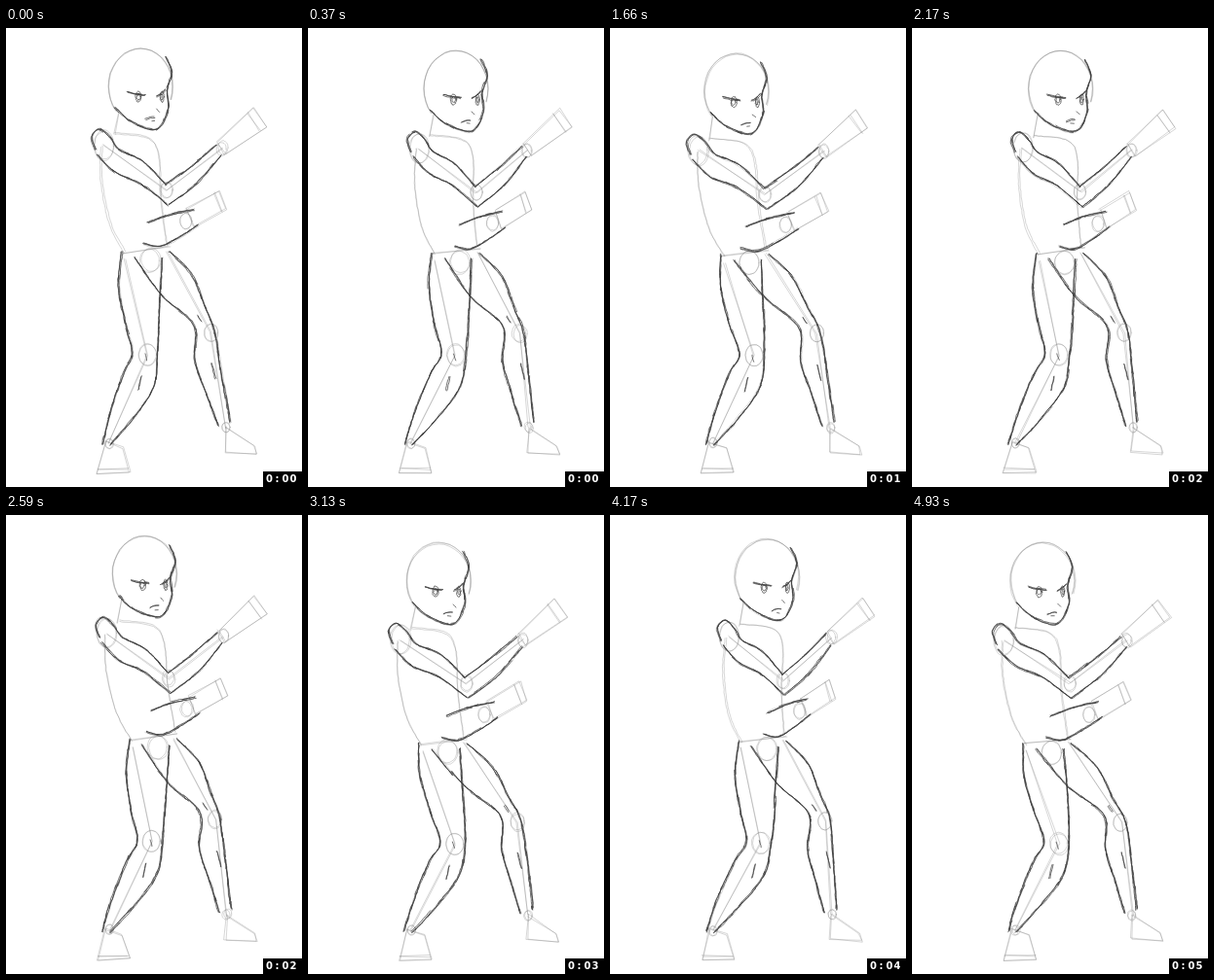
These frames come from a looping animation (304x472 px, 5.03 s). An HTML page:

```html
<!DOCTYPE html>
<html lang="en">
<head>
<meta charset="utf-8">
<title>Pencil figure</title>
<style>
  html, body { margin: 0; width: 100%; height: 100%; overflow: hidden; background: #fff; }
  svg { display: block; width: 100%; height: 100%; }
  path { fill: none; stroke-linecap: round; stroke-linejoin: round; }
  text { font: bold 10px "DejaVu Sans", sans-serif; fill: #fff; }
</style>
</head>
<body>
<svg viewBox="0 0 304 472">
  <path id="light" stroke="#888" stroke-width=".45" stroke-opacity=".75"/>
  <path id="dark" stroke="#3c3c3c" stroke-width=".9" stroke-opacity=".8"/>
  <rect x="264" y="456" width="40" height="16"/>
  <text id="clock" x="267 276.5 283.5 291.5" y="467">0:00</text>
</svg>
<script>
const LOOP = 5030, SWAY = 1790, SECOND = 960;
// Start of each drawing, in ms
const cuts = [0, 120, 250, 370, 510, 630, 750, 860, 980, 1120, 1240, 1400, 1540, 1660, 1780, 1910,
  2030, 2170, 2300, 2440, 2590, 2720, 2870, 3010, 3130, 3270, 3390, 3530, 3650, 3800, 3920,
  4170, 4290, 4450, 4590, 4700, 4820, 4930];

// The sway: pixels of offset at a few moments of its cycle
const keys = [0, 590, 800, 980, 1345, 1660, SWAY];
const channels = {
  lean: [0, 22, 4, 0, -5, -9, 0],
  dip: [0, 4, 1, -1, 8, 5, 0],
  hip: [0, 13, 8, -6, -5, -5, 0]
};

const el = id => document.getElementById(id);
const clamp = v => Math.min(1, Math.max(0, v));
const lastIndex = (list, t) => list.filter(v => v <= t).length - 1;
const pairs = row => row.flatMap((v, i) => i % 2 ? [] : [[v, row[i + 1]]]);
const between = (a, b, k) => [a[0] + (b[0] - a[0]) * k, a[1] + (b[1] - a[1]) * k];

let seed = 1;
const rand = () => (seed = seed * 16807 % 2147483647) / 2147483647;
const wobble = size => (rand() * 2 - 1) * size;

function channel(values, phase) {
  const i = lastIndex(keys, phase);
  return values[i] + (values[i + 1] - values[i]) * (phase - keys[i]) / (keys[i + 1] - keys[i]);
}

// How each region of the body follows the sway
const follow = {
  head: (x, y, { lean, dip }) => [x + lean, y + dip],
  arm(x, y, { lean, dip }) {
    const out = clamp((x - 100) / 120);
    return [x + lean * (1 - .75 * out), y + dip * (1 - .4 * out)];
  },
  torso(x, y, { lean, dip, hip }) {
    const down = clamp((y - 110) / 120);
    return [x + lean + (hip - lean) * down, y + dip * (1 - .4 * down)];
  },
  leg(x, y, { dip, hip }) {
    const up = clamp((430 - y) / 200), knee = clamp(1 - Math.abs(y - 325) / 95);
    return [x + hip * up + 1.1 * dip * knee, y + .6 * dip * up];
  }
};

function smooth(pts) {
  const out = [];
  for (let i = 0; i < pts.length - 1; i++) {
    const a = pts[i - 1] || pts[i], b = pts[i], c = pts[i + 1], d = pts[i + 2] || c;
    const steps = Math.ceil(Math.hypot(c[0] - b[0], c[1] - b[1]) / 3);
    for (let n = 0; n < steps; n++) {
      const s = n / steps;
      out.push([0, 1].map(k => b[k] + s * (c[k] - a[k]) / 2
        + s * s * (a[k] - 2.5 * b[k] + 2 * c[k] - d[k] / 2)
        + s * s * s * (1.5 * (b[k] - c[k]) + (d[k] - a[k]) / 2)));
    }
  }
  return [...out, pts[pts.length - 1]];
}

function arc([cx, cy], rx, ry, from = 0, to = 360) {
  return Array.from({ length: 25 }, (_, i) => {
    const a = (from + (to - from) * i / 24) * Math.PI / 180;
    return [cx + rx * Math.cos(a), cy + ry * Math.sin(a)];
  });
}

function trace(pts, spread, grain) {
  const dx = wobble(spread), dy = wobble(spread);
  return pts.map(([x, y], i) => (i ? 'L' : 'M') + (x + dx + wobble(grain)).toFixed(1)
    + ' ' + (y + dy + wobble(grain)).toFixed(1)).join('');
}

function draw(index) {
  const phase = cuts[index] % SWAY, pose = {};
  for (const name in channels) pose[name] = channel(channels[name], phase);
  seed = 977 + index * 7919;
  let dark = '', light = '';

  const place = (region, ...row) => pairs(row).map(([x, y]) => follow[region](x, y, pose));
  const thin = (pts, passes = 2) => {
    for (let n = 0; n < passes; n++) light += trace(pts, 1.1, .3);
  };
  const straight = pts => {
    for (let n = 0; n < 2; n++) light += trace(pts, .4, 1.1);
  };
  // Short overlapping strokes along a curve
  const ink = (pts, passes = 3) => {
    const line = smooth(pts);
    for (let n = 0; n < passes; n++) {
      for (let i = 0; i < line.length - 1;) {
        const end = i + 5 + Math.floor(rand() * 9);
        dark += trace(line.slice(Math.max(0, i - 1), end + 1), .85, .35);
        i = end;
      }
    }
  };
  const outline = (...spec) => {
    const pts = place(...spec);
    ink(pts);
    thin(smooth(pts), 1);
  };
  const box = (region, ...row) => {
    const pts = place(region, ...row), [a, b, c, d] = pts;
    straight([...pts, a]);
    straight([between(a, b, .85), between(d, c, .85)]);
  };
  const ball = (center, rx, ry) => thin(arc(center, rx, ry));
  const mark = ([x, y], offsets, passes = 2) =>
    ink(pairs(offsets).map(([dx, dy]) => [x + dx, y + dy]), passes);

  // Head
  const [skull, eye, eye2, mouth] = place('head', 139, 60, 136, 71, 160, 71, 149, 92);
  thin(arc(skull, 33, 39, 140, 380), 3);
  outline('head', 164, 30, 170, 46, 165, 64, 166, 84, 154, 104, 128, 96, 112, 82);
  mark(eye, [-11, -5, -3, -3, 7, -2], 3);
  mark(eye2, [-5, -1, 0, -4, 4, -8], 3);
  for (const [spot, rx] of [[eye, 3], [eye2, 2]]) {
    dark += trace(arc(spot, rx, 5.5), .4, .4) + trace(arc(spot, rx - 1, 3), .4, .4);
  }
  mark(mouth, [-5, 2, 0, 0, 4, 0]);
  mark(mouth, [0, 4, 3, 4], 1);
  mark(mouth, [6, -8, 9, -5], 1);
  if (Math.abs(phase - 980) < 60) {
    thin(arc([156, 32], 27, 30));
    thin(arc([158, 30], 20, 25), 1);
  }

  // Torso
  thin(smooth(place('torso', 98, 122, 98, 158, 107, 202, 122, 231)));
  thin(smooth(place('torso', 112, 108, 146, 113, 157, 132, 159, 175, 165, 222)));
  straight(place('torso', 115, 86, 111, 110));
  straight(place('torso', 120, 231, 168, 225));
  ball(place('torso', 148, 239)[0], 10, 12);

  // Arms
  const [shoulder, elbow, wrist, wrist2] =
    place('arm', 100, 121, 165, 167, 222, 124, 184, 199);
  ball(shoulder, 10, 15);
  ball(elbow, 6, 8);
  ball(wrist, 5, 7);
  ball(wrist2, 6, 8);
  straight([shoulder, elbow, wrist]);
  outline('arm', 92, 125, 88, 112, 96, 104, 107, 113, 116, 125, 140, 137, 164, 161);
  outline('arm', 94, 130, 112, 148, 138, 160, 166, 182);
  outline('arm', 164, 161, 190, 142, 216, 120);
  outline('arm', 167, 182, 196, 160, 221, 131);
  outline('arm', 146, 200, 168, 192, 193, 187);
  outline('arm', 141, 222, 158, 225, 180, 214, 197, 203);
  box('arm', 217, 118, 254, 82, 267, 101, 225, 130);
  box('arm', 186, 186, 219, 167, 226, 186, 193, 205);

  // Legs
  const [knee, knee2, ankle, ankle2] = place('leg', 145, 336, 210, 313, 106, 427, 226, 411);
  ball(knee, 9, 11);
  ball(knee2, 7, 9);
  ball(ankle, 4, 5);
  ball(ankle2, 4, 5);
  straight([...place('leg', 122, 238), knee, ankle]);
  straight([...place('leg', 165, 230), knee2, ankle2]);
  outline('leg', 119, 230, 116, 264, 122, 303, 130, 334, 121, 354, 107, 395, 99, 428);
  outline('leg', 160, 236, 158, 284, 156, 332, 152, 369, 130, 402, 107, 429);
  outline('leg', 168, 230, 191, 254, 204, 286, 214, 311, 221, 352, 230, 405);
  outline('leg', 132, 236, 160, 275, 193, 306, 194, 342, 206, 376, 218, 409);
  mark(knee, [-6, 22, -9, 36]);
  mark(knee, [-2, -2, 0, 5], 1);
  mark(knee2, [1, 32, 5, 48]);
  mark(knee2, [-13, -17, -9, -11]);

  // Feet
  box('leg', 102, 426, 94, 458, 127, 457, 120, 432);
  straight(place('leg', 226, 411, 225, 436, 258, 438, 255, 430, 226, 411));

  el('dark').setAttribute('d', dark);
  el('light').setAttribute('d', light);
  el('clock').textContent = '0:0' + Math.floor((cuts[index] + 30) / SECOND);
}

const start = performance.now();
let shown = -1;
function tick() {
  const index = lastIndex(cuts, (performance.now() - start) % LOOP);
  if (index !== shown) draw(shown = index);
  requestAnimationFrame(tick);
}
tick();
</script>
</body>
</html>
```
